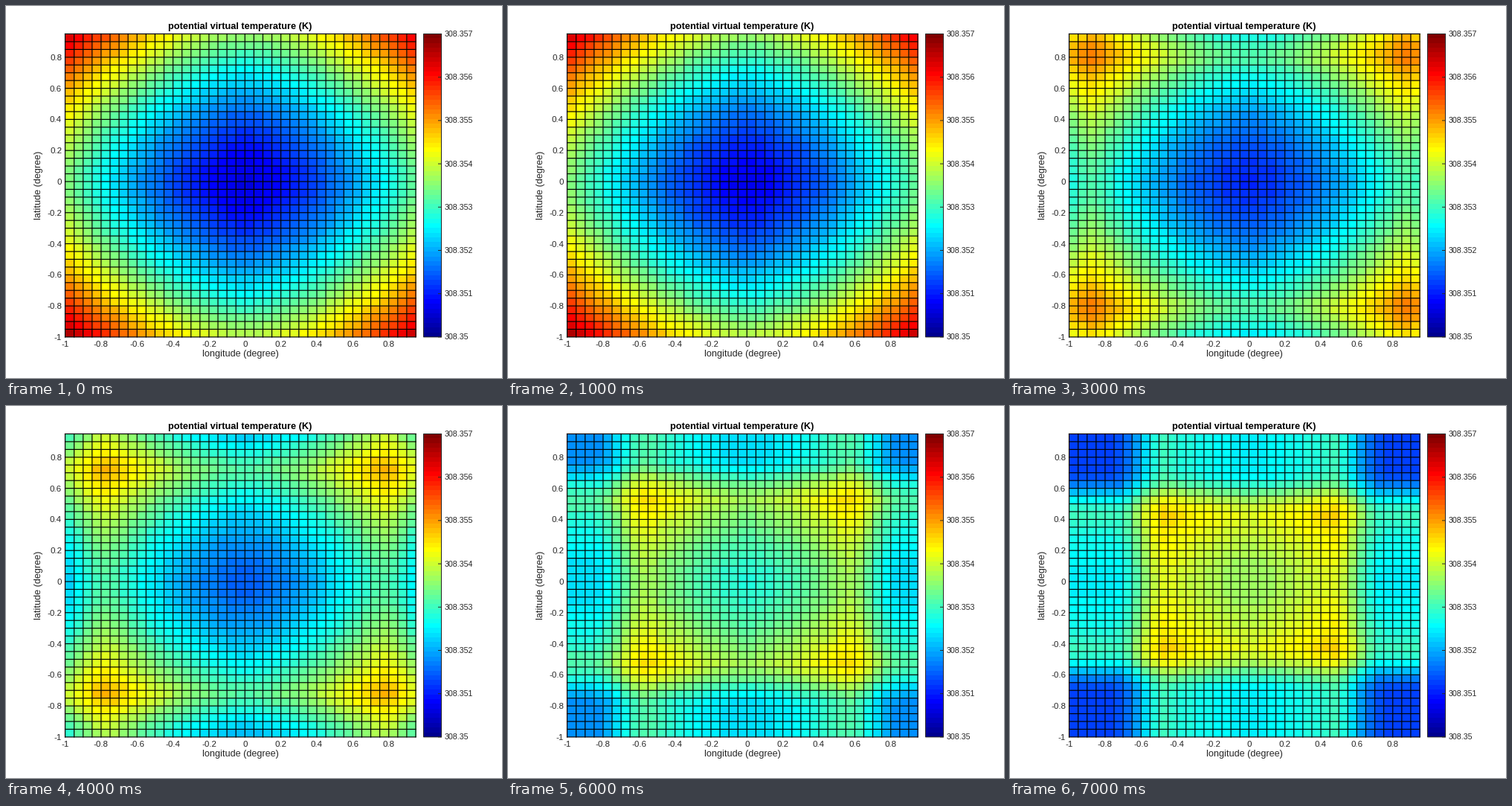
A matplotlib script for the animation above (8 s loop, 667 by 500 pixels).

```python
import numpy as np
import matplotlib.pyplot as plt
from matplotlib.animation import FuncAnimation
from matplotlib.patches import Rectangle

W, H = 667, 500
FRAMES, STEP_MS = 8, 1000
LEFT, RIGHT, TOP, BOTTOM = 79.5, 551.0, 37.5, 444.9
BAR_LEFT, BAR_RIGHT = 561.5, 585.5
CELLS, SHADES = 39, 64
T_MIN, T_MAX = 308.35, 308.357
INK = "#262626"

plt.rcParams["font.family"] = "Liberation Sans"
fig = plt.figure(figsize=(W / 100, H / 100), dpi=100, facecolor="white")
ax = fig.add_axes([0, 0, 1, 1])
ax.axis("off")


def px(pixels):
    """Convert pixels to typographic points."""
    return pixels * 0.72


def x_pos(lon):
    return LEFT + (lon + 1) / 1.95 * (RIGHT - LEFT)


def y_pos(lat):
    return BOTTOM - (lat + 1) / 1.95 * (BOTTOM - TOP)


def label(x, y, text, size, color=INK, **style):
    ax.text(x, y, text, fontsize=px(size), color=color, **style)


def line(xs, ys, width, color="black"):
    ax.plot(xs, ys, color=color, lw=px(width), zorder=3,
            solid_capstyle="projecting", snap=False)


# Jet palette in 64 discrete steps
level = np.arange(1, SHADES + 1) / SHADES
jet = np.stack([np.clip(1.5 - np.abs(4 * level - k), 0, 1) for k in (3, 2, 1)], axis=1)

# The wave crest moves inward at constant speed; its heights vary with time (mK)
KEYS = [0, 2, 3, 4, 5, 7]
BASE = [0.30, 0.40, 0.52, 0.73, 1.02, 1.80]
RISE = [3.65, 2.60, 2.10, 1.70, 1.22, 0.53]
DROP = [1.00, 1.00, 1.00, 1.05, 1.12, 1.68]
CREST_WIDTH = 0.3
centers = -0.975 + 0.05 * np.arange(CELLS)


def profile(crest, t):
    base, rise, drop = (np.interp(t, KEYS, v) for v in (BASE, RISE, DROP))
    r = np.abs(centers)
    inner = np.minimum(r / crest, 1) ** 1.55
    outer = np.clip((r - crest) / CREST_WIDTH, 0, 1)
    return base + rise * inner - drop * np.sin(np.pi / 2 * outer) ** 2


def field(t):
    along_x = profile(1.155 - 0.1 * t, t)
    along_y = profile(1.07 - 0.0925 * t, t)
    temp = (along_y[:, None] + along_x[None, :]) / 1000
    index = np.floor(temp / (T_MAX - T_MIN) * SHADES).astype(int)
    return jet[np.clip(index, 0, SHADES - 1)]


heat = ax.imshow(field(0), extent=(LEFT, RIGHT, BOTTOM, TOP), origin="lower",
                 interpolation="nearest", aspect="auto")
ax.imshow(jet[::-1, None, :], extent=(BAR_LEFT, BAR_RIGHT, BOTTOM, TOP),
          interpolation="nearest", aspect="auto")

# Cell grid
for edge in -1 + 0.05 * np.arange(CELLS + 1):
    line([x_pos(edge)] * 2, [TOP, BOTTOM], 1.2)
    line([LEFT, RIGHT], [y_pos(edge)] * 2, 1.2)

# Axis labels
for tick in np.arange(-5, 5) / 5:
    text = f"{tick:g}"
    label(x_pos(tick), 458.5, text, 11.5, ha="center", va="baseline")
    label(75, y_pos(tick) + 4, text, 11.5, ha="right", va="baseline")
label(315, 31, "potential virtual temperature (K)", 12.7, color="black",
      ha="center", va="baseline", weight="bold")
label(315, 471, "longitude (degree)", 12.6, ha="center", va="baseline")
label(44, 241, "latitude (degree)", 12.6, ha="center", va="center", rotation=90)

# Colour bar
ax.add_patch(Rectangle((BAR_LEFT, TOP), BAR_RIGHT - BAR_LEFT, BOTTOM - TOP,
                       fill=False, ec=INK, lw=px(1), zorder=4, snap=False))
for i in range(8):
    ty = BOTTOM - i / 7 * (BOTTOM - TOP)
    line([BAR_RIGHT - 4, BAR_RIGHT], [ty, ty], 1, INK)
    label(589.5, ty + 3.5, f"{T_MIN + i / 1000:.6g}", 10.6, ha="left", va="baseline")

ax.set_xlim(0, W)
ax.set_ylim(H, 0)


def update(t):
    heat.set_data(field(t))
    return [heat]


anim = FuncAnimation(fig, update, frames=FRAMES, interval=STEP_MS,
                     repeat=True, repeat_delay=0, blit=False)
plt.show()
```
